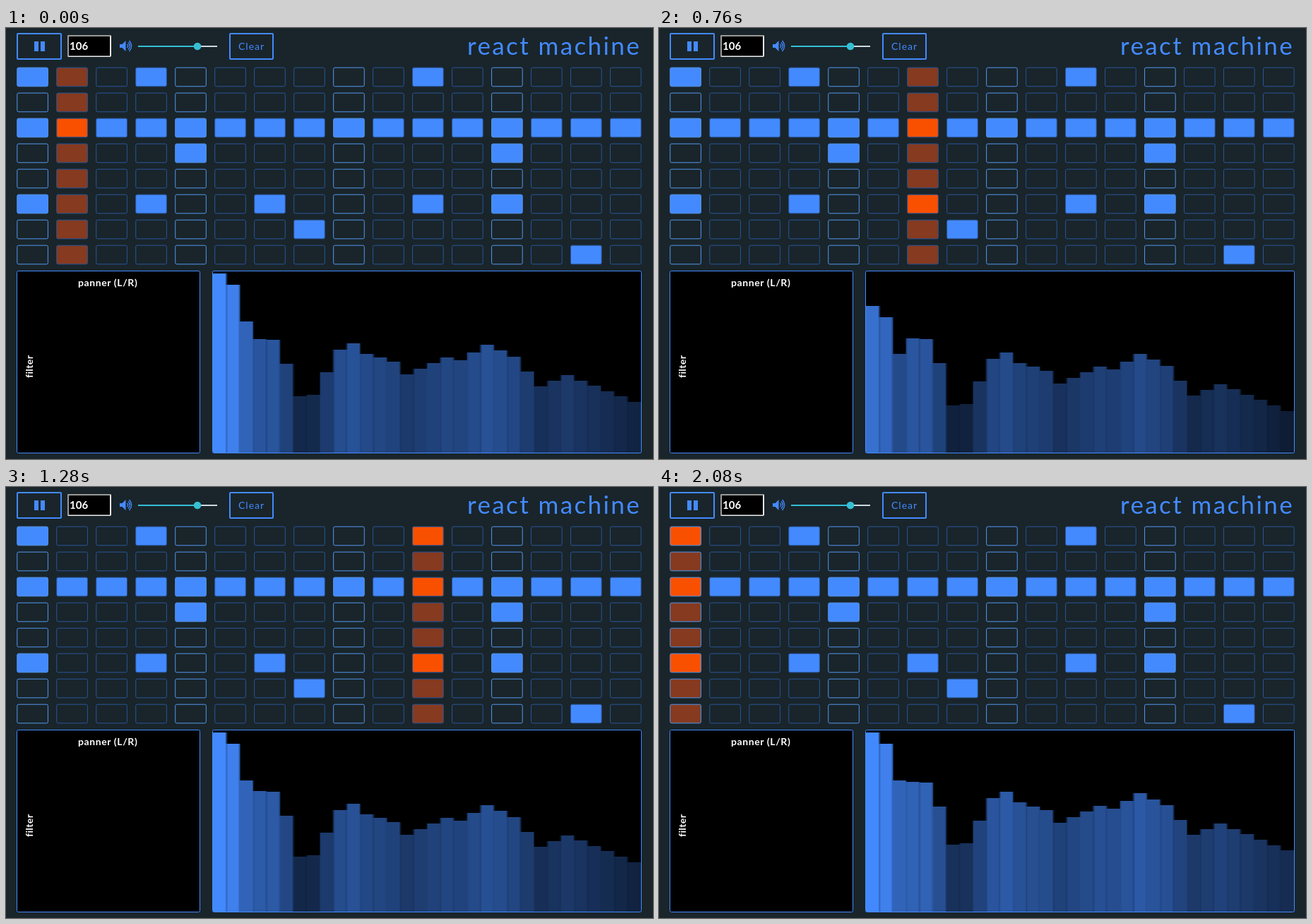
Animation, 916 px wide and 611 px high, one loop 2180 ms. Source, as an HTML page with a canvas:

```html
<!DOCTYPE html>
<html lang="en">
<head>
<meta charset="utf-8">
<title>Drum machine</title>
<style>
  html, body { margin: 0; width: 100%; height: 100%; overflow: hidden; background: #19252b; }
  svg, canvas { position: absolute; display: block; }
  svg { left: 0; top: 0; }
  canvas { left: 293px; top: 345px; width: 606px; height: 257px; }
  text { font: 700 14px Lato, "Open Sans", sans-serif; fill: #fff; }
  .line { fill: none; stroke: #448aff; stroke-width: 2; }
  .blue { fill: #448aff; font-weight: 400; }
  .title { font-size: 35px; }
  .panel { fill: #000; stroke: #448aff; }
</style>
</head>
<body>
<svg width="916" height="611" viewBox="0 0 916 611">
  <rect class="line" x="16" y="8" width="62" height="36" rx="1"/>
  <path class="blue" d="M40 19h6v14h-6zM49 19h6v14h-6z"/>

  <rect x="87" y="10" width="62" height="31" rx="2" fill="#eee"/>
  <path d="M87 41V12q0-2 2-2h60l-2 2H89v27z" fill="#9a9a9a"/>
  <rect x="89" y="12" width="58" height="27.500"/>
  <text x="90" y="31" style="font-size:15px">106</text>

  <path class="blue" d="M161 23h3.500l5-5v15l-5-5H161z"/>
  <path d="M171.500 23q2.500 2.500 0 5M173 20.500q5 5 0 10M174.500 18q6.500 7.500 0 15" fill="none" stroke="#448aff" stroke-width="1.400"/>

  <path d="M271 26h28" stroke="#cfd8dc" stroke-width="2"/>
  <path d="M187 26h84" stroke="#35bfd5" stroke-width="2"/>
  <circle cx="271" cy="26" r="5.300" fill="#35bfd5"/>

  <rect class="line" x="317" y="8" width="61" height="36" rx="1"/>
  <text class="blue" x="329" y="31" letter-spacing="1">Clear</text>
  <text class="blue title" x="653" y="38" letter-spacing="2.400">react machine</text>

  <g id="grid"></g>

  <rect class="panel" x="15.500" y="344.500" width="259" height="258" rx="2"/>
  <text x="102" y="366" letter-spacing=".6">panner (L/R)</text>
  <text transform="translate(38 496) rotate(-90)" letter-spacing=".4">filter</text>
  <rect class="panel" x="292.500" y="344.500" width="607" height="258" rx="2"/>
</svg>
<canvas id="spectrum" width="300" height="257"></canvas>

<script>
const LOOP = 2180, FRAME = 87, PHASE = 410 % FRAME;
const STEP = 141.5, LEAD = 60, BARS = 32, FLOOR = 602;
const BLUE = '#448aff', HIT = '#f95000', IDLE = '#863a1f';
const KICK = 0, HAT = 2, BASS = 5;

// Sequencer pattern, one string per instrument
const pattern = [
  'x..x......x.....',
  '................',
  'xxxxxxxxxxxxxxxx',
  '....x.......x...',
  '................',
  'x..x..x...x.x...',
  '.......x........',
  '..............x.'
];

const grid = document.getElementById('grid');
const cells = pattern.map((row, r) => [...row].map((mark, c) => {
  const cell = document.createElementNS('http://www.w3.org/2000/svg', 'rect');
  const attrs = { x: 15.8 + 55.98 * c, y: 56.2 + 36 * r, width: 43.6, height: 26.6, rx: 2,
    stroke: c % 4 ? '#2a5599' : '#5597ee' };
  for (const name in attrs) cell.setAttribute(name, attrs[name]);
  return grid.appendChild(cell);
}));

// Peaks and valleys of the loudest spectrum: band, top edge
const outline = [[0, 348], [1, 364], [2, 416], [4, 419], [5, 453], [6, 512], [7, 510],
  [9, 446], [10, 437], [11, 452], [13, 463], [14, 481], [17, 457], [18, 461],
  [20, 439], [22, 456], [24, 498], [26, 482], [31, 520]];

function peak(band) {
  const n = Math.max(1, outline.findIndex(p => p[0] >= band));
  const [x0, y0] = outline[n - 1], [x1, y1] = outline[n];
  return y0 + (y1 - y0) * (band - x0) / (x1 - x0);
}

// Time since the instrument last sounded
function age(row, t) {
  const ages = [...pattern[row]].map((mark, c) => {
    const start = (c + 15) % 16 * STEP - LEAD;
    return mark === 'x' ? (t - start + LOOP) % LOOP : LOOP;
  });
  return Math.min(...ages);
}

const ctx = document.getElementById('spectrum').getContext('2d');

function draw(t) {
  const active = (Math.floor((t + LEAD) / STEP) + 1) % 16;
  cells.forEach((row, r) => row.forEach((cell, c) => {
    const on = pattern[r][c] === 'x';
    cell.setAttribute('fill', c === active ? (on ? HIT : IDLE) : on ? BLUE : 'none');
  }));

  const kickFall = 0.123 * Math.max(0, age(KICK, t) - 160);
  const bassFall = 0.2 * age(BASS, t);
  const hatFall = 0.25 * age(HAT, t) - 5;
  const width = 300 / BARS;
  ctx.clearRect(0, 0, 300, 257);
  for (let i = 0; i < BARS; i++) {
    const fall = i < 3 ? kickFall : i < 6 ? bassFall : hatFall;
    const height = Math.round(FLOOR - peak(i) - fall);
    ctx.fillStyle = `rgba(68,138,255,${Math.min(1, height / 255 * 1.03 - 0.03)})`;
    ctx.fillRect(i * width, 257 - height, width, height);
  }
}

const began = performance.now();
function tick() {
  const now = (performance.now() - began) % LOOP;
  draw(Math.max(0, Math.floor((now - PHASE) / FRAME) * FRAME + PHASE));
  requestAnimationFrame(tick);
}
tick();
</script>
</body>
</html>
```
